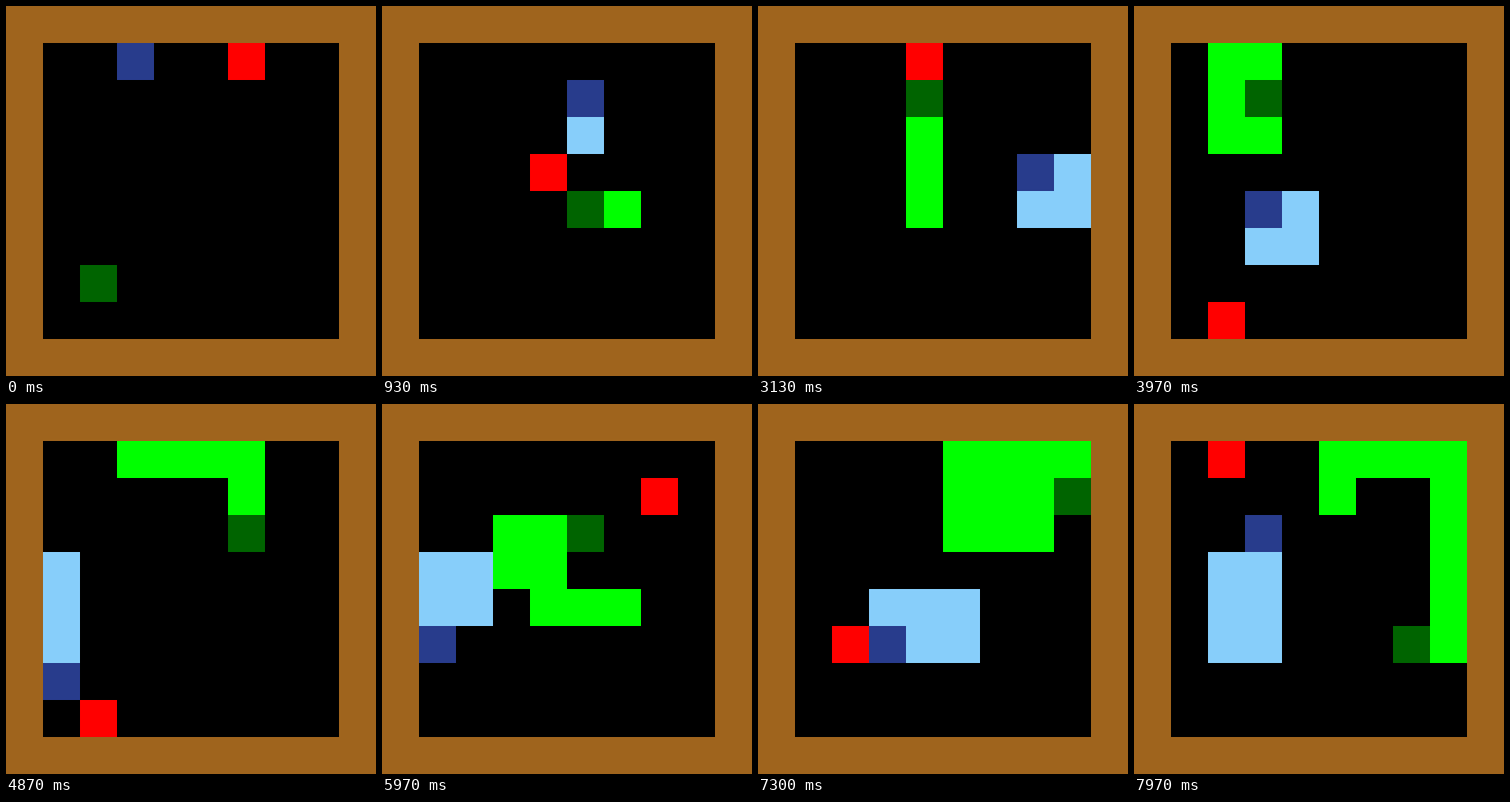
Animation, 400 px wide and 400 px high, one loop 8 s. Source, as an HTML page with a canvas:

```html
<!DOCTYPE html>
<html lang="en">
<head>
<meta charset="utf-8">
<title>Two snakes</title>
<style>
  html, body { margin: 0; width: 100%; height: 100%; overflow: hidden; background: #9f641d; }
  canvas { display: block; width: 400px; height: 400px; }
</style>
</head>
<body>
<canvas id="stage" width="400" height="400"></canvas>
<script>
const CELL = 40;
const LOOP = 8000;
const STEP = LOOP / 60;
const LEAD = 38; // the first move comes one video frame short of a full step
const WALL = '#9f641d';
const FLOOR = '#000000';
const APPLE = '#ff0000';
const DIRS = { L: [-1, 0], R: [1, 0], U: [0, -1], D: [0, 1] };

const snakes = [
  {
    start: [1, 6], head: '#006400', body: '#00ff00',
    moves: 'RRURRULULD DDLDLUUURR UUUULLDDRU URRRDDDDLL ULURRRRULL URRRDDDDDL'
  },
  {
    start: [2, 0], head: '#283c8c', body: '#87cefa',
    moves: 'RRRDDLUULL DDDRRURRDD RULLLLDDLU ULLDDDDRUU UULDDDRRRU RULLDLUURU'
  }
];

// Each apple appears once the one before it has been eaten.
const apples = [
  [5, 0], [5, 4], [3, 3], [2, 6], [4, 2], [6, 3], [3, 0], [1, 2], [1, 7],
  [2, 3], [4, 2], [6, 1], [4, 1], [4, 4], [7, 0], [1, 5], [1, 0]
];

function walk({ start, moves }) {
  const path = [start];
  for (const move of moves.replace(/ /g, '')) {
    const [x, y] = path[path.length - 1];
    const [dx, dy] = DIRS[move];
    path.push([x + dx, y + dy]);
  }
  return path;
}

function simulate() {
  const paths = snakes.map(walk);
  const lengths = snakes.map(() => 1);
  let current = 0;
  return paths[0].map((_, n) => {
    paths.forEach((path, i) => {
      if (String(path[n]) === String(apples[current])) {
        lengths[i]++;
        current++;
      }
    });
    return {
      apple: apples[current],
      bodies: paths.map((path, i) => path.slice(Math.max(0, n + 1 - lengths[i]), n + 1))
    };
  });
}

const states = simulate();
const ctx = document.getElementById('stage').getContext('2d');

function fillCell([x, y], color) {
  ctx.fillStyle = color;
  ctx.fillRect((x + 1) * CELL, (y + 1) * CELL, CELL, CELL);
}

function draw({ apple, bodies }) {
  ctx.fillStyle = WALL;
  ctx.fillRect(0, 0, 400, 400);
  ctx.fillStyle = FLOOR;
  ctx.fillRect(CELL, CELL, 8 * CELL, 8 * CELL);
  fillCell(apple, APPLE);
  bodies.forEach((cells, i) => {
    const last = cells.length - 1;
    cells.forEach((cell, j) => fillCell(cell, j === last ? snakes[i].head : snakes[i].body));
  });
}

const began = performance.now();
function tick() {
  const time = (performance.now() - began) % LOOP;
  draw(states[Math.floor((time + LEAD) / STEP)]);
  requestAnimationFrame(tick);
}
tick();
</script>
</body>
</html>
```
